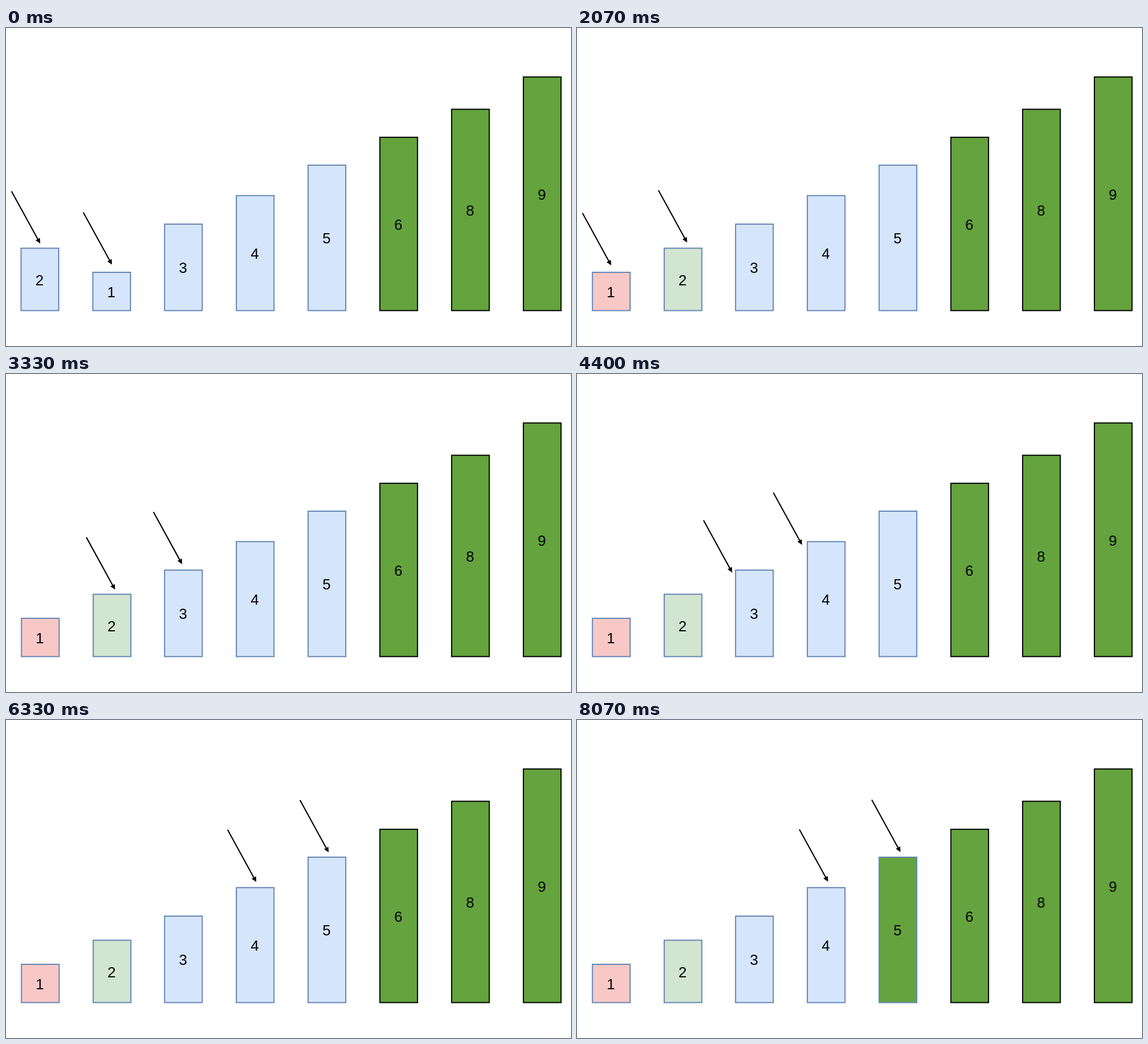
An HTML page that plays this animation: 998x561 px, repeating every 9070 ms.

```html
<!DOCTYPE html>
<html lang="en">
<head>
<meta charset="utf-8">
<title>Bubble sort pass</title>
<style>
  html, body { margin: 0; width: 100%; height: 100%; overflow: hidden; background: #fff; }
  svg { display: block; width: 100vw; height: 100vh; }
  rect { stroke-width: 2; }
  text { font: 26px "Liberation Sans", Arial, sans-serif; text-anchor: middle; }
  line { stroke: #000; stroke-width: 2.1; }
</style>
</head>
<body>
<svg id="stage" viewBox="0 0 998 561"></svg>
<script>
const LOOP = 9070, FPS = 15;
const BASE = 498.5, WIDTH = 66.5, LEFT = 26.6, PITCH = 126.76;
const BLUE = [213, 229, 251], PINK = [248, 200, 198], MINT = [210, 229, 208], GREEN = [100, 163, 62];
const EDGE = '#6486b6';
const stage = document.getElementById('stage');

function add(parent, tag, attrs) {
  const node = document.createElementNS('http://www.w3.org/2000/svg', tag);
  for (const key in attrs) node.setAttribute(key, attrs[key]);
  return parent.appendChild(node);
}

const rgb = color => `rgb(${color.map(Math.round)})`;
const mix = (from, to, p) => from.map((v, i) => v + (to[i] - v) * p);
const move = (node, x, y) => node.setAttribute('transform', `translate(${x} ${y})`);

// Sine ease-in-out progress between two times
function ease(t, start, end) {
  const u = Math.min(1, Math.max(0, (t - start) / (end - start)));
  return (1 - Math.cos(Math.PI * u)) / 2;
}

function makeBar(value, slot, top, color, edge) {
  const group = add(stage, 'g', {});
  const height = BASE - top;
  const rect = add(group, 'rect', { y: top, width: WIDTH, height, fill: rgb(color), stroke: edge });
  add(group, 'text', { x: WIDTH / 2 - 0.7, y: top + height / 2 + 10.2 }).textContent = value;
  const x = LEFT + slot * PITCH;
  move(group, x, 0);
  return { group, rect, x };
}

function makeArrow() {
  const group = add(stage, 'g', {});
  add(group, 'line', { x1: 0, y1: 0, x2: 47, y2: 85.6 });
  add(group, 'path', { d: 'M50.7 92.2L42.5 86.5L50.2 82.3Z' });
  return group;
}

const two = makeBar(2, 0, 388.5, BLUE, EDGE);
const one = makeBar(1, 1, 431, BLUE, EDGE);
makeBar(3, 2, 346, BLUE, EDGE);
makeBar(4, 3, 295.7, BLUE, EDGE);
const five = makeBar(5, 4, 242, BLUE, EDGE);
makeBar(6, 5, 192.8, GREEN, '#000');
makeBar(8, 6, 143.4, GREEN, '#000');
makeBar(9, 7, 86.4, GREEN, '#000');

// Tail positions at each stop, and the times of the moves between them
const steps = [[2120, 3420], [3620, 4900], [5120, 6420]];
const arrows = [
  { node: makeArrow(), stops: [[9.7, 288], [9.7, 326.6], [143.4, 287.7], [263.2, 243.3], [392.8, 193]],
    moves: [[230, 1730], ...steps] },
  { node: makeArrow(), stops: [[136.5, 325.2], [143.8, 286.2], [261.7, 242.8], [389, 192.5], [520.7, 140.8]],
    moves: [[300, 1980], ...steps] }
];

function render(t) {
  const swap = ease(t, 230, 1730);
  move(two.group, two.x + (PITCH + 0.7) * swap, 0);
  move(one.group, one.x - (PITCH - 0.7) * swap, 0);
  two.rect.setAttribute('fill', rgb(mix(BLUE, MINT, swap)));
  one.rect.setAttribute('fill', rgb(mix(BLUE, PINK, swap)));
  five.rect.setAttribute('fill', rgb(mix(BLUE, GREEN, ease(t, 6620, 7960))));
  for (const { node, stops, moves } of arrows) {
    const tail = moves.reduce((at, [start, end], i) => mix(at, stops[i + 1], ease(t, start, end)), stops[0]);
    move(node, ...tail);
  }
}

const begin = performance.now();
function tick() {
  const t = (performance.now() - begin) % LOOP;
  render(Math.floor((t + 3.4) * FPS / 1000) * 1000 / FPS);
  requestAnimationFrame(tick);
}
tick();
</script>
</body>
</html>
```
